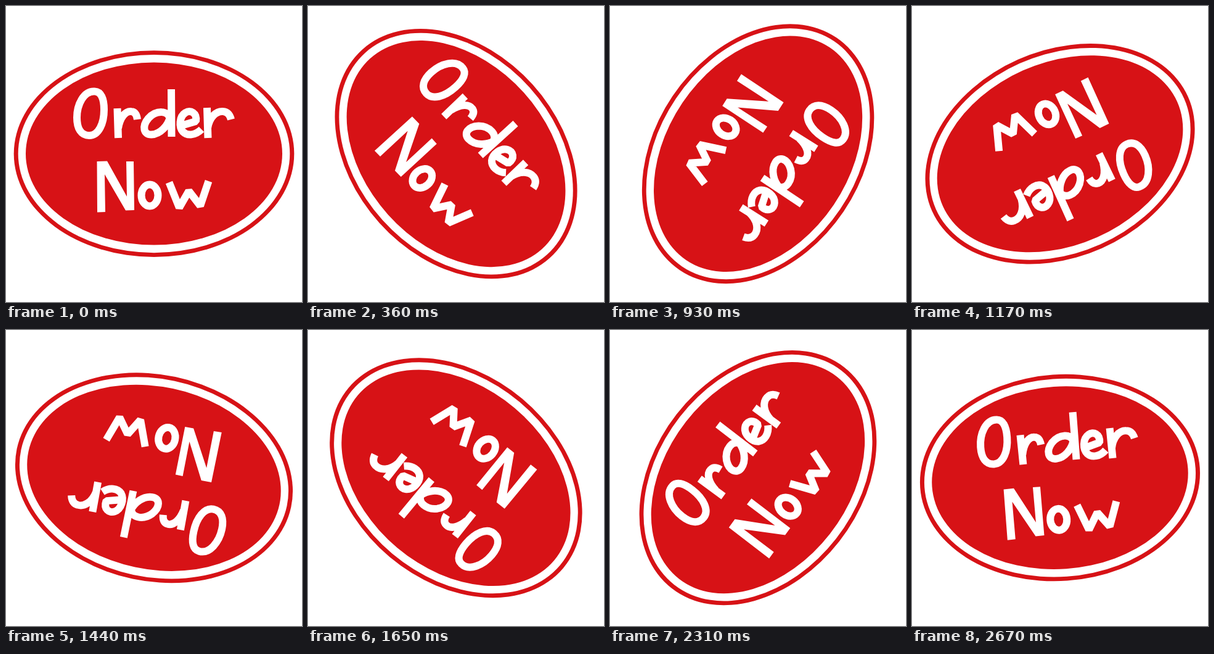
These frames come from a looping animation (480x480 px, 2700 ms). An HTML page:

```html
<!DOCTYPE html>
<html lang="en">
<head>
<meta charset="utf-8">
<title>Order Now</title>
<style>
  html, body { margin: 0; width: 100%; height: 100%; overflow: hidden; background: #fff; }
  svg { display: block; width: 100vw; height: 100vh; }
  .pen { fill: none; stroke: #fff; stroke-width: 12; stroke-linejoin: bevel; }
</style>
</head>
<body>
<svg viewBox="0 0 480 480" role="img" aria-label="Order Now">
  <g id="badge">
    <g fill="#d71216">
      <ellipse cx="240" cy="239.6" rx="227.3" ry="167.4"/>
      <ellipse cx="240" cy="239.6" rx="220.3" ry="160.6" fill="#fff"/>
      <ellipse cx="240" cy="239.6" rx="208" ry="148"/>
    </g>
    <!-- Order -->
    <g class="pen">
      <path d="M144 138.5C126 137 115 160 115 181C115 199 122 210 135 210C150 210 159 191 159 168C159 150 154 139 144 138.5Z"/>
      <path id="r" d="M180.500 166L182 214M182 198C185 180 194 170 203 171C209 171.500 212 176 213 184"/>
      <path d="M268 135L268.500 212M266 184C264 168 243 169 231 182C220 195 223 209 236 208.500C250 208 263 194 266 180"/>
      <path d="M284 194L308 187C310 173 299 168 291 173C281 179 280 196 287 204C294 211 307 210 317 200"/>
      <path d="M326 165L327.500 214M327 198C330 180 341 170 352 171C359 171.500 363 176 365 184"/>
    </g>
    <!-- Now -->
    <path fill="#fff" d="M147.500 252L164 251.500L196 309L195 252L207 252L208 331L194 331.500L160 273L161 334L148 334.500Z"/>
    <g class="pen">
      <ellipse cx="233" cy="307" rx="13.500" ry="17.500"/>
      <path d="M264.500 286L281 327L296.500 300L315 324L328.500 284"/>
    </g>
  </g>
</svg>
<script>
  const LOOP = 2700, STEP = 30;
  const badge = document.getElementById("badge");
  const start = performance.now();

  function draw(ms) {
    const step = Math.floor((ms % LOOP) / STEP);
    const angle = step * 360 * STEP / LOOP;
    badge.setAttribute("transform", `rotate(${angle} 240 239.7)`);
  }

  function tick(now) {
    draw(Math.max(0, now - start));
    requestAnimationFrame(tick);
  }

  draw(0);
  requestAnimationFrame(tick);
</script>
</body>
</html>
```
